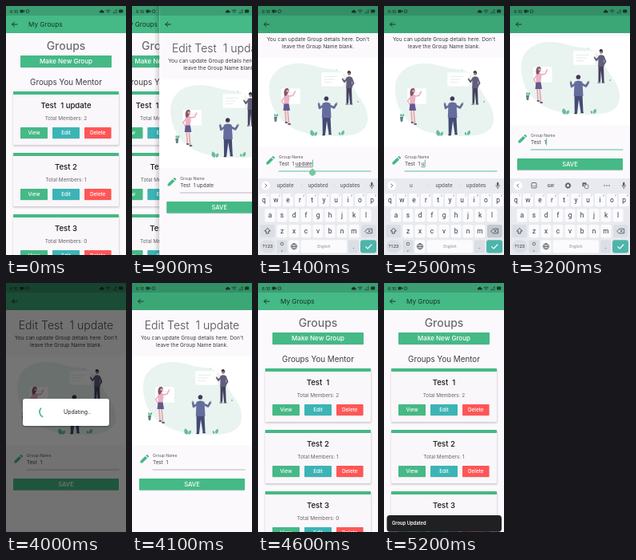
Recreate the animation shown at these times as an HTML page. Size 150 by 312 pixels, loop 5300 ms.

```html
<!DOCTYPE html>
<html lang="en">
<head>
<meta charset="utf-8">
<title>Edit a group</title>
<style>
html, body { margin: 0; width: 100%; height: 100%; overflow: hidden; background: #fcf9fc; }
svg { display: block; width: 100vw; height: 100vh; }
text { font-family: Inter, "Open Sans", sans-serif; white-space: pre; }
#keyboard text { font-family: Roboto, "Noto Sans", sans-serif; }
</style>
</head>
<body>
<svg id="stage" viewBox="0 0 150 312" xmlns="http://www.w3.org/2000/svg"></svg>
<script>
const LOOP = 5300, STEP = 100;
const GREEN = '#45b986', DEEP_GREEN = '#3ba777', TEAL = '#3cb4b5', RED = '#ff5656', INK = '#20242a';

const rect = (x, y, w, h, fill, r = 0, more = '') =>
  `<rect x="${x}" y="${y}" width="${w}" height="${h}" rx="${r}" fill="${fill}" ${more}/>`;
const circle = (x, y, r, fill, more = '') =>
  `<circle cx="${x}" cy="${y}" r="${r}" fill="${fill}" ${more}/>`;
const fillPath = (d, fill, more = '') => `<path d="${d}" fill="${fill}" ${more}/>`;
const line = (d, color, width = 1, more = '') =>
  `<path d="${d}" fill="none" stroke="${color}" stroke-width="${width}" stroke-linecap="round" stroke-linejoin="round" ${more}/>`;
const label = (x, y, str, size, fill = INK, weight = 400, anchor = 'middle', more = '') =>
  `<text x="${x}" y="${y}" font-size="${size}" fill="${fill}" font-weight="${weight}" text-anchor="${anchor}" ${more}>${str}</text>`;
const group = (id, body, more = '') => `<g id="${id}" ${more}>${body}</g>`;

const header = (title, id) => rect(0, 0, 150, 34, GREEN, 0, `id="${id}"`) +
  line('M14 23H7.6M10.4 20.2L7.6 23L10.4 25.8', '#17352a', 1) +
  label(28, 26, title, 8.2, '#17352a', 400, 'start');

const button = (x, y, w, h, fill, str, size) =>
  rect(x, y + .6, w, h, '#000', .8, 'opacity=".16"') + rect(x, y, w, h, fill, .8) +
  label(x + w / 2, y + h / 2 + size * .36, str, size, '#fff', 500);

const card = (y, title, members, id) =>
  rect(9, y + 1, 132.5, 67.5, '#000', 1, 'opacity=".2" filter="url(#soft)"') +
  rect(9, y, 132, 67, '#faf7fa', 1) + rect(9, y, 132, 4, GREEN, .8) +
  label(75, y + 21.3, title, 9.6, '#17171a', 500, 'middle', id ? `id="${id}"` : '') +
  label(75, y + 36.3, `Total Members: ${members}`, 6.4, '#66646a') +
  button(18, y + 45, 34, 14, GREEN, 'View', 6.4) +
  button(58, y + 45, 34, 14, TEAL, 'Edit', 6.4) +
  button(98, y + 45, 33.5, 14, RED, 'Delete', 6.4);

const listPage = () => rect(0, 0, 150, 312, '#fcf9fc') +
  label(75, 55, 'Groups', 14, '#6d6d70', 500) +
  button(18, 62, 114, 15, GREEN, 'Make New Group', 8) +
  label(75, 99, 'Groups You Mentor', 9.8, '#3d3d42') +
  card(107, 'Test  1 update', 2, 'firstTitle') + card(184, 'Test 2', 1) + card(261, 'Test 3', 0) +
  rect(58, 152, 34, 14, '#fff', 1, 'id="press" opacity="0"') + header('My Groups', 'listBar');

const board = (x, y, w, h) => rect(x, y, w, h, '#fff', 1, 'stroke="#e2edeb" stroke-width=".4"') +
  [0.3, 0.5, 0.7].map((k, i) => line(`M${x + 4} ${y + h * k}h${w * (.55 - i * .12)}`, '#d6e5e1', .7)).join('');

const leaf = (x, y, s, lean) => fillPath('M0 0C-5 -3 -4 -8 0 -11C4 -7 4 -3 0 0', '#69bd98',
  `transform="translate(${x} ${y}) rotate(${lean}) scale(${s})"`);

const woman = () => line('M34 157L35 172M37 157L38.5 174', '#e5a3a8', 1.7) +
  line('M34.4 173h2M38 175h2.4', '#40375f', 1.3) +
  line('M39 140L44 139L46.5 134', '#eba9b4', 1.5) + line('M33.5 141L29.5 146L32 150', '#eba9b4', 1.4) +
  fillPath('M32.5 139Q36 136.5 39.5 139L38.5 150H32.5Z', '#ecb2c4') +
  fillPath('M32.5 149.5H38.6L40 158H31.5Z', '#625990') +
  fillPath('M33 139C31.5 133 34 129.6 36.6 130C39.6 130.6 39 134 37.6 136L35 140Z', '#83566a') +
  circle(37, 133.6, 1.7, '#e5a3a8');

const centerMan = () => fillPath('M80.5 165H90.5L91.5 187H88.5L86 171L84 188H80.8Z', '#454a75') +
  line('M81 152L77 155L76 149.5M90 152L95 154.5L98 149.5', '#646d9c', 2.6) +
  circle(76, 148.4, 1, '#d6a09a') + circle(98.4, 148.6, 1, '#d6a09a') +
  fillPath('M80.5 149Q85.5 146 90.5 149L91.5 167H79.8Z', '#646d9c') + circle(85.4, 143.6, 2.6, '#d6a09a') +
  fillPath('M82.6 144C82 139 88.4 139 88.2 143.4L87 145.6H83.8Z', '#3c3a58') +
  line('M80.8 188.6h2.6M88.8 187.6h2.6', '#33334c', 1.2);

const rightMan = () => fillPath('M110.5 128H117L117.6 149H115L113.8 135L113 149H110.5Z', '#45425f') +
  line('M111.4 118L108 122L106 119', '#625c7c', 2) + circle(105.6, 118.2, .9, '#a97c76') +
  fillPath('M110.6 116.6Q114 114 117.4 116.6L117.6 130H110.2Z', '#625c7c') +
  line('M117 117.6L119.4 123.6L116.6 128', '#625c7c', 2) +
  circle(114, 111.8, 2.1, '#a97c76') + fillPath('M111.6 111C111.4 107 116.6 107 116.2 112L114.6 110.8Z', '#3a3550') +
  line('M110 150h2.6M115 149.8h2.8', '#33334c', 1.2);

const illustration = () => rect(0, 92, 150, 111, '#fff') +
  fillPath('M14 135C12 112 28 100 48 99C64 98 76 105 90 106C104 107 113 114 119 128C125 143 138 151 137 170C136 186 118 191 96 190C66 190 40 184 26 166C18 156 15 146 14 135Z', '#e9f4f1') +
  board(79, 110, 28, 18) + board(29, 130, 24, 20) +
  fillPath('M20 166h4l-.8 6h-2.4Z', '#5f8084') + leaf(22, 166, .4, -15) + leaf(23, 166, .4, 25) +
  leaf(69, 190, .75, -18) + leaf(71, 190, .55, 25) + leaf(105, 189, .6, 20) + leaf(103, 189, .4, -25) +
  circle(98, 107, .7, '#8ccbb0') + circle(125, 147, .8, '#6f7890') +
  woman() + rightMan() + centerMan();

const pencil = fillPath('M10.4 225.6V223L16.5 217l2.6 2.6L13 225.6ZM17.3 216.2l1-1q.6-.4 1.1 0l1.5 1.5q.4.6 0 1.1l-1 1Z', GREEN);

const editPage = () => rect(-7, 0, 7, 312, 'url(#edge)') + rect(0, 0, 150, 312, '#fcf9fc') +
  group('form',
    label(75, 57.5, 'Edit Test  1 update', 14.1, '#4c4c50', 300) +
    label(75, 70.5, "You can update Group details here. Don't", 6.6, '#3b3b40') +
    label(75, 80, 'leave the Group Name blank.', 6.6, '#3b3b40') +
    illustration() + pencil +
    label(26, 218, 'Group Name', 5.1, '#55555a', 400, 'start') +
    label(26, 226.7, '', 6.4, '#404044', 400, 'start', 'id="field"') +
    line('M26 234H141', '#8c8c90', .6, 'id="rule"') +
    line('', '#444', .6, 'id="composing"') +
    rect(0, 219.6, .9, 9, GREEN, 0, 'id="cursor"') +
    fillPath('M0 -5L3 -2.6A4 4 0 1 1 -3 -2.6Z', '#74c9a4', 'id="handle"') +
    button(9, 245, 132, 14.6, GREEN, 'SAVE', 7.6)) +
  header('', 'editBar');

const GREY_KEY = '#dbdfe5';
const key = (cx, cy, str, w = 13, fill = '#fbfbfd') => rect(cx - w / 2, cy - 8, w, 16.2, fill, 2.2) +
  label(cx, cy + 3, str, 8.4, '#33373c');
const keyRow = (letters, x, y) => [...letters].map((c, i) => key(x + i * 15, y, c)).join('');

const toolbar = () => rect(27, 221.5, 6, 6.5, 'none', 1, 'stroke="#5a5f65" stroke-width=".9"') +
  line('M28.7 225.4q1.5 1.4 3 0', '#5a5f65', .7) + label(51, 227, 'GIF', 5.6, '#5a5f65', 700) +
  circle(72.5, 225, 2.4, 'none', 'stroke="#5a5f65" stroke-width="1.5"') +
  circle(72.5, 225, 3.4, 'none', 'stroke="#5a5f65" stroke-width="1" stroke-dasharray="1.3 1.37"') +
  rect(90.5, 221.3, 5, 5, '#5a5f65', .8) + label(93, 225.5, 'G', 4, '#fff', 700) +
  rect(93.6, 224, 4.3, 4.6, '#e8ebef', .8, 'stroke="#5a5f65" stroke-width=".7"') +
  [118, 121, 124].map(x => circle(x, 225, .8, '#5a5f65')).join('');

const keyboard = () => rect(0, 216, 150, 97, '#e8eaef') +
  circle(9.8, 225, 5.4, '#fff') + line('', '#5a5f65', .9, 'id="chevron"') +
  group('words', [34, 75, 115].map(x => label(x, 227.4, '', 6.9, '#55595e')).join('') +
    line('M54.5 222v6M95.5 222v6', '#cfd3d8', .5)) +
  group('tools', toolbar()) +
  rect(141, 220.8, 2.4, 5, '#5a5f65', 1.2) + line('M139.8 224.6q.4 2.8 2.4 2.8t2.4-2.8M142.2 227.4v1.6', '#5a5f65', .7) +
  keyRow('qwertyuiop', 7.5, 243) +
  [...'1234567890'].map((c, i) => label(12 + i * 15, 239, c, 3.2, '#85898f')).join('') +
  keyRow('asdfghjkl', 15, 262.3) + keyRow('zxcvbnm', 30, 282) +
  key(11.7, 282, '', 18.5, GREY_KEY) + line('M11.7 278.6L8.4 282H10.2V285H13.2V282H15Z', '#33383d', .8) +
  rect(129, 274, 18.6, 16.2, GREY_KEY, 2.2, 'id="backspace"') +
  line('M134 282L136.6 279.2H142.6V284.8H136.6ZM138 280.8l2.4 2.4M140.4 280.8l-2.4 2.4', '#33383d', .7) +
  rect(2.5, 293.2, 19, 16.2, GREY_KEY, 8) + label(12, 303.4, '?123', 6, '#33383d') +
  key(30, 301.3, '', 13, GREY_KEY) + label(30, 306.5, ',', 7) +
  circle(30, 298, 1.8, 'none', 'stroke="#33383d" stroke-width=".6"') +
  key(45, 301.3, '') +
  line('M41.4 301.3a3.6 3.6 0 1 0 7.2 0a3.6 3.6 0 1 0 -7.2 0h7.2M45 297.7q-3.2 3.6 0 7.2q3.2-3.6 0-7.2', '#33383d', .7) +
  rect(53.5, 293.2, 57.5, 16.2, '#fbfbfd', 2.2) + label(82.3, 303, 'English', 5, '#8d9298') +
  key(119.4, 301.3, '.', 13, GREY_KEY) + rect(128, 293.2, 20, 16.2, '#4db5a9', 3) +
  line('M134.7 301.6l2.4 2.4l4.8-5', '#fff', 1.1);

const statusBar = () => rect(0, 0, 150, 12, '#000', 0, 'opacity=".14"') +
  label(5, 8.6, '6:10', 5.2, '#17352a', 500, 'start') + rect(17.6, 4.7, 4, 3.8, '#17352a', .7) +
  fillPath('M21.4 6.6L23.2 5V8.2Z', '#17352a') + circle(27, 6.6, 1.9, 'none', 'stroke="#17352a" stroke-width=".8"') +
  fillPath('M117.5 8.4q-1.6-2 .6-2.5q1.6-2.2 3.2 0q2.3.4.8 2.5Z', '#17352a') +
  line('M125 5.7q2.6-2 5.2 0M126.2 7.1q1.4-1 2.8 0M127.6 8.4v.1', '#17352a', .8) +
  line('M134 8.4L138.2 4.4V8.4Z', '#17352a', .6) + rect(141, 4.4, 5.2, 4, '#17352a', 1);

const stage = document.getElementById('stage');
stage.innerHTML = `<defs>
  <filter id="soft" x="-10%" y="-10%" width="120%" height="125%"><feGaussianBlur stdDeviation="1"/></filter>
  <linearGradient id="edge"><stop offset="0" stop-opacity="0"/><stop offset="1" stop-opacity=".16"/></linearGradient></defs>` +
  group('list', listPage()) + group('edit', editPage()) + group('keyboard', keyboard()) + statusBar() +
  rect(0, 0, 150, 312, '#000', 0, 'id="dim"') +
  group('dialog', rect(21, 146, 108, 34, '#000', 3, 'opacity=".35" filter="url(#soft)"') +
    rect(21, 145, 108, 34, '#fff', 3) + line('', GREEN, 1.7, 'id="spinner" stroke-linecap="butt"') +
    label(72, 164.4, 'Updating..', 7, '#222226', 400, 'start')) +
  group('toast', rect(3.5, 291, 143.5, 20.8, '#202022', 4) + label(10, 303.4, 'Group Updated', 5.8, '#fff', 600, 'start'));

const ui = {};
stage.querySelectorAll('[id]').forEach(el => ui[el.id] = el);
const words = ui.words.querySelectorAll('text');

const clamp = v => Math.min(1, Math.max(0, v));
const span = (t, from, to) => clamp((t - from) / (to - from));
const mix = (a, b, k) => a + (b - a) * k;
const easeOut = k => 1 - (1 - k) ** 3;
const set = (el, attrs) => { for (const name in attrs) el.setAttribute(name, attrs[name]); };
const show = (el, visible) => set(el, { visibility: visible ? 'visible' : 'hidden' });
const move = (el, x, y) => set(el, { transform: `translate(${x} ${y})` });

// Page slide curve: cubic bezier (.35,.91) (.33,.97), solved by bisection.
function slideEase(x) {
  const bezier = (a, b, s) => 3 * (1 - s) ** 2 * s * a + 3 * (1 - s) * s * s * b + s ** 3;
  let lo = 0, hi = 1;
  for (let i = 0; i < 20; i++) {
    const mid = (lo + hi) / 2;
    if (bezier(.35, .33, mid) < x) lo = mid; else hi = mid;
  }
  return x >= 1 ? 1 : bezier(.91, .97, lo);
}

function drawField(t) {
  const erased = Math.min(7, Math.max(0, Math.floor((t - 2000) / 100)));
  const full = 'Test  1 update';
  const text = full.slice(0, full.length - erased);
  const word = text.slice(8);
  const focused = t >= 1200 && t < 3400;
  ui.field.textContent = text;
  const end = 26 + ui.field.getComputedTextLength();
  const start = text.length > 8 ? 26 + ui.field.getSubStringLength(0, 8) : end;
  set(ui.rule, { stroke: focused ? GREEN : '#8c8c90', 'stroke-width': focused ? .9 : .6 });
  set(ui.composing, { d: `M${start} 228.6H${end}` });
  show(ui.composing, focused && word);
  set(ui.cursor, { x: end + .2 });
  show(ui.cursor, focused && !(t >= 1900 && t < 2100));
  move(ui.handle, end + .3, 235.6);
  show(ui.handle, t >= 1300 && t < 2100);

  const typing = erased < 7;
  show(ui.words, typing);
  show(ui.tools, !typing);
  set(ui.chevron, { d: typing ? 'M8.9 223l2 2l-2 2' : 'M10.7 223l-2 2l2 2' });
  const guesses = erased ? [word, 'update', 'updates'] : ['update', 'updated', 'updates'];
  words.forEach((el, i) => el.textContent = guesses[i]);
  set(ui.backspace, { fill: t >= 2100 && t < 2800 ? '#c3c9d1' : GREY_KEY });
}

function draw(t) {
  const open = t < 4200 ? slideEase(span(t, 800, 1100)) : 1 - slideEase(span(t, 4200, 4600));
  move(ui.list, -50 * open, 0);
  move(ui.edit, 150 * (1 - open), 0);
  show(ui.edit, open > 0);
  set(ui.editBar, { fill: open === 1 ? DEEP_GREEN : GREEN });
  ui.firstTitle.textContent = t < 4600 ? 'Test  1 update' : 'Test  1';
  set(ui.press, { opacity: t >= 700 && t < 900 ? .25 : 0 });

  const raised = easeOut(span(t, 1100, 1400)) * (1 - span(t, 3250, 3500) ** 2);
  move(ui.keyboard, 0, 97 * (1 - raised));
  show(ui.keyboard, raised > 0);
  const dragged = easeOut(span(t, 2800, 3200));
  move(ui.form, 0, -mix(27, 54, dragged) * raised);
  drawField(t);

  set(ui.dim, { opacity: .54 * span(t, 3300, 3500) * (1 - span(t, 4000, 4100)) });
  set(ui.dialog, { opacity: span(t, 3350, 3500) * (1 - span(t, 4000, 4100)) });
  const phase = (t - 3500) / 1400;
  const from = 2 * Math.PI * (phase * 1.4 - .17);
  const sweep = Math.PI / 180 * (60 + 215 * Math.cos(Math.PI * phase) ** 2);
  const at = a => `${49 + 7 * Math.cos(a)} ${161.5 + 7 * Math.sin(a)}`;
  set(ui.spinner, { d: `M${at(from)}A7 7 0 ${sweep > Math.PI ? 1 : 0} 1 ${at(from + sweep)}` });

  const rise = span(t, 4600, 5200);
  move(ui.toast, 0, 24 * (1 - Math.sqrt(1 - (1 - rise) ** 2)));
  show(ui.toast, rise > 0);
}

const began = performance.now();
function tick() {
  const t = Math.max(0, performance.now() - began) % LOOP;
  draw(Math.floor(t / STEP) * STEP);
  requestAnimationFrame(tick);
}
tick();
</script>
</body>
</html>
```
